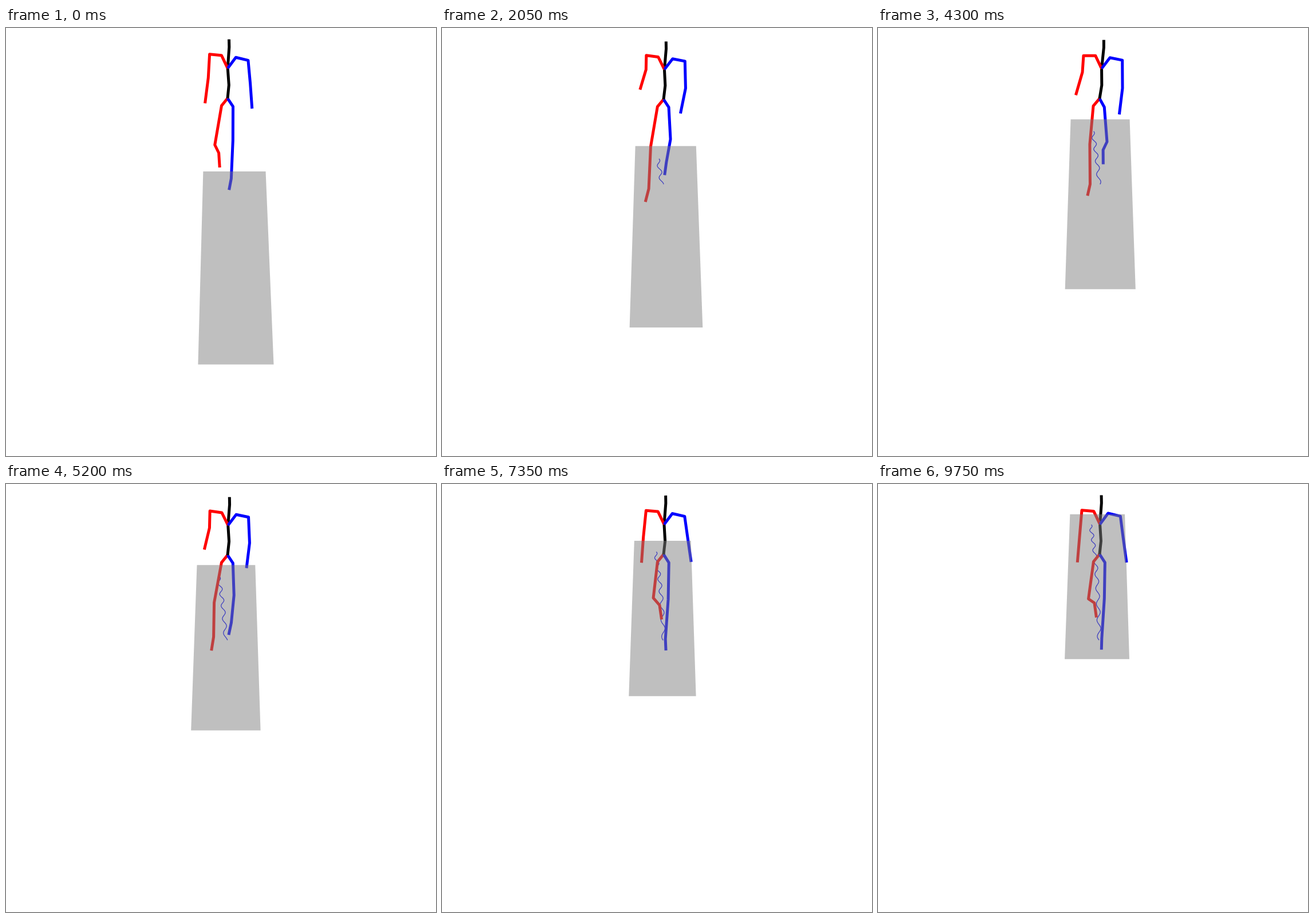
These frames come from a looping animation (751 px wide and 746 px high, 9.8 s). An HTML page with a canvas:

```html
<!DOCTYPE html>
<html lang="en">
<head>
<meta charset="utf-8">
<title>Walking figure</title>
<style>
  html, body { margin: 0; width: 100%; height: 100%; overflow: hidden; background: #fff; }
  canvas { display: block; }
</style>
</head>
<body>
<canvas id="stage" width="751" height="746"></canvas>
<script>
const ctx = document.getElementById('stage').getContext('2d');
const LOOP = 9800, STEP = 50;
const RED = '#f00', BLUE = '#00f', BLACK = '#000';

// Perspective: everything on the floor converges at (VANISH_X, -HORIZON).
const VANISH_X = 387, HORIZON = 1353, DEPTH_RATE = 8.858e-6;
const FLOOR_Y = 273.5, FLOOR_SCALE = FLOOR_Y + HORIZON;

// Walk: distance covered, strides completed and sideways drift after t seconds.
const distance = t => 0.975 * t + 0.0004 * t ** 3;
const stride = t => 0.945 * t - 0.13 + 0.31 * Math.sin(0.46 * t);
const drift = t =>
  1 + 20.4 * (1 - Math.exp(-t / 4.5)) - 3.2 * (1 - wave(stride(t), 0, 1, 0));

const recede = (y, d) => 1 / (1 / (y + HORIZON) + DEPTH_RATE * d) - HORIZON;

// Cyclic motion around a mean; each harmonic is given by amplitude and peak phase.
function wave(phase, mean, ...harmonics) {
  let value = mean;
  for (let i = 0; i < harmonics.length; i += 2) {
    value += harmonics[i] * Math.cos(Math.PI * (i + 2) * (phase - harmonics[i + 1]));
  }
  return value;
}

// Heights of one leg's joints; both legs share them, half a stride apart.
function legHeights(phase) {
  const ankle = wave(phase, 248, 33, 0.214, 10, 0.056, 5.2, 0.02);
  return {
    knee: wave(phase, 200.2, 6.6, 0.03),
    ankle,
    toe: ankle + wave(phase, 22.5, 3, 0.83)
  };
}

function rightLeg(phase) {
  const { knee, ankle, toe } = legHeights(phase);
  return [
    [wave(phase, 370, 6.5, 0.47), knee],
    [wave(phase, 375.3, 12, 0.54, 2.4, 0.33), ankle],
    [wave(phase, 374.5, 15.5, 0.57, 4, 0.33), toe]
  ];
}

function leftLeg(phase) {
  const { knee, ankle, toe } = legHeights(phase - 0.485);
  return [
    [wave(phase, 397.5, 2.5, 0.2), knee],
    [wave(phase, 395.2, 5, 0.42, 4, 0.43), ankle],
    [wave(phase, 394.3, 7, 0.45, 2, 0.43), toe]
  ];
}

const rightArm = phase => [
  [wave(phase, 354.3, 2.8, 0.18), wave(phase, 86, 11.5, 0.59, 3, 0.37)],
  [wave(phase, 347, 1.6, 0.68), wave(phase, 129.5, 17, 0.57, 7, 0.37)]
];

const leftArm = phase => [
  [wave(phase, 428, 2.6, 0.53), wave(phase, 97.5, 8.5, 0.14)],
  [wave(phase, 429.5, 11, 0.58, 3, 0.37), wave(phase, 143, 8, 0.17)]
];

function polyline(points, color, width) {
  ctx.beginPath();
  points.forEach(p => ctx.lineTo(p[0], p[1]));
  ctx.strokeStyle = color;
  ctx.lineWidth = width;
  ctx.lineJoin = 'round';
  ctx.stroke();
}

function drawTrail(t) {
  const now = drift(t), walked = distance(t), points = [];
  for (let s = 0; s < t - 0.01; s += STEP / 1000) {
    const y = recede(FLOOR_Y, walked - distance(s));
    points.push([VANISH_X + (drift(s) - now) * (y + HORIZON) / FLOOR_SCALE, y]);
  }
  if (points.length > 1) polyline(points, BLUE, 1.3);
}

function drawBody(t) {
  const phase = stride(t);
  const sway = wave(phase, 0, 1, 0.38);
  const bob = wave(2 * phase, 0, 1, 0.13);
  const joint = (x, y, swayX, bobY, swayY = 0) => [x + swayX * sway, y + bobY * bob + swayY * sway];

  const root = joint(387, 123.3, 0, 1);
  const belly = joint(390.3, 99.8, 1, 0.5);
  const chest = joint(389.4, 71.2, 2.2, 1.1);
  const neck = joint(392.8, 34.6, 3, 1.8);
  const head = joint(392.7, 21.4, 3.2, 2.1);
  const rightHip = joint(376.2, 136.2, -0.3, 1);
  const leftHip = joint(395.7, 137.9, -0.8, 0.6, 0.6);
  const rightCollar = joint(378.6, 48.9, 2.3, 1.6);
  const leftCollar = joint(403.8, 52.3, 2.4, 1.4);
  const rightShoulder = joint(357.8, 47.7, 2.2, 0.7, 1.5);
  const leftShoulder = joint(425.4, 56.7, 2.5, 1, -0.5);

  polyline([root, rightHip, ...rightLeg(phase)], RED, 5);
  polyline([root, leftHip, ...leftLeg(phase)], BLUE, 5);
  polyline([root, belly, chest, neck, head], BLACK, 5);
  polyline([chest, rightCollar, rightShoulder, ...rightArm(phase)], RED, 5);
  polyline([chest, leftCollar, leftShoulder, ...leftArm(phase)], BLUE, 5);
}

function drawFloor(t) {
  const d = distance(t), shift = drift(t) / FLOOR_SCALE;
  const top = recede(250, d), bottom = recede(586.5, d);
  const corner = (slope, y) => ctx.lineTo(VANISH_X + (slope - shift) * (y + HORIZON), y);
  ctx.beginPath();
  corner(-0.0266, top);
  corner(0.0415, top);
  corner(0.0415, bottom);
  corner(-0.0266, bottom);
  ctx.fillStyle = 'rgba(128, 128, 128, 0.5)';
  ctx.fill();
}

function render(now) {
  const t = Math.floor((now % LOOP) / STEP) * STEP / 1000;
  ctx.fillStyle = '#fff';
  ctx.fillRect(0, 0, 751, 746);
  drawTrail(t);
  drawBody(t);
  drawFloor(t);
}

let start;
function tick(now) {
  if (start === undefined) start = now;
  render(now - start);
  requestAnimationFrame(tick);
}
render(0);
requestAnimationFrame(tick);
</script>
</body>
</html>
```
